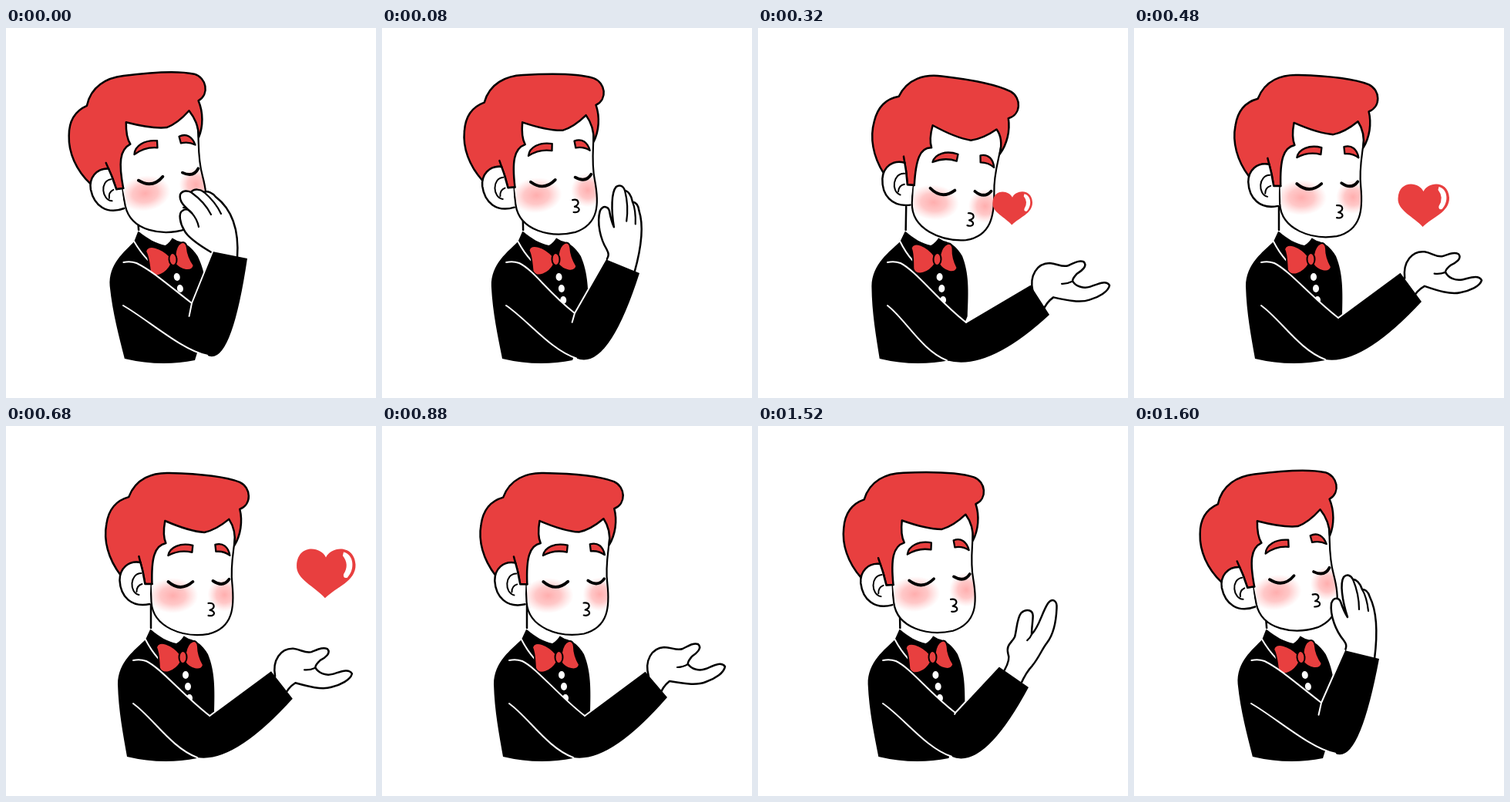
Recreate the animation shown at these times as an HTML page with a canvas. Size 480 by 480 pixels, loop 1680 ms.

```html
<!DOCTYPE html>
<html lang="en">
<head>
<meta charset="utf-8">
<title>Blown kiss</title>
<style>
html, body { margin: 0; width: 100%; height: 100%; overflow: hidden; background: #fff; }
canvas { display: block; width: 480px; height: 480px; }
</style>
</head>
<body>
<canvas id="stage" width="480" height="480"></canvas>
<script>
const ctx = document.getElementById('stage').getContext('2d');
const RED = '#e83f3f', LOOP = 1680, STEP = 80, PIVOT = 470;

// head: x, y, degrees, nod; lean: shift of the bow tie; cuff: upper and lower corner
const poses = [
  { t: 0, head: [-27, -2, -9, -4], lean: -13, armpit: [241, 357], cuff: [268, 290, 313, 299], elbow: [292, 440], tilt: 0, hand: 'cupped' },
  { t: 80, head: [-11, -1, -5, -2], lean: -4, armpit: [250, 370], cuff: [290, 300, 334, 318], elbow: [293, 446], tilt: 0, hand: 'raised' },
  { t: 160, head: [5, 1, -1.5, 1], lean: 7, armpit: [259, 382], cuff: [318, 320, 357, 348], elbow: [293, 455], tilt: 0, hand: 'half' },
  { t: 240, head: [7, 1, 2.5, 3], lean: 5, armpit: [265, 383], cuff: [337, 328, 368, 361], elbow: [297, 450], tilt: -14, hand: 'open' },
  { t: 320, head: [8, 1, 5, 5], lean: 3, armpit: [270, 382], cuff: [353, 333, 378, 372], elbow: [298, 446], tilt: -5, hand: 'open' },
  { t: 480, head: [1, 0, 0.2, 0], lean: 0, armpit: [265, 376], cuff: [345, 317, 373, 355], elbow: [296, 438], tilt: 5, hand: 'open' },
  { t: 880, head: [0, 0, -0.6, 0], lean: 0, armpit: [263, 376], cuff: [341, 318, 370, 352], elbow: [295, 438], tilt: 0, hand: 'open' },
  { t: 1360, head: [0, 0, 0, 0], lean: 0, armpit: [264, 376], cuff: [342, 318, 371, 353], elbow: [295, 438], tilt: 0, hand: 'open' },
  { t: 1440, head: [-1, 0, 0, 0], lean: 0, armpit: [264, 376], cuff: [344, 319, 373, 354], elbow: [295, 438], tilt: 3, hand: 'open' },
  { t: 1520, head: [-9, -1, -4, -1], lean: -3, armpit: [256, 372], cuff: [312, 312, 351, 339], elbow: [293, 447], tilt: 0, hand: 'half' },
  { t: 1600, head: [-23, -1.5, -9, -3], lean: -13, armpit: [243, 359], cuff: [273, 291, 318, 302], elbow: [292, 440], tilt: 0, hand: 'raised' }
];

const heartKeys = [
  { t: 160, at: [300, 230], width: 36 },
  { t: 320, at: [330, 233], width: 52 },
  { t: 480, at: [375.5, 229], width: 67 },
  { t: 560, at: [398, 216], width: 75 },
  { t: 640, at: [415, 190], width: 77 },
  { t: 720, at: [423, 152], width: 77 },
  { t: 800, at: [425, 104], width: 76 }
];

// Each hand is drawn around the cuff it was posed with.
const hands = {
  cupped: {
    cuff: [268, 290, 313, 299],
    shape: 'M268 292C256 285 236 273 231 262C226 254 223 240 229 237C233 234 237 235 241 240C232 232 224 225 226 216C229 210 236 211 240 213C244 208 252 209 257 213C262 211 268 214 272 219C289 232 303 255 300 298',
    creases: 'M241 240Q248 248 250 258M240 213Q258 226 266 242M257 213Q272 226 279 241'
  },
  raised: {
    cuff: [273, 291, 318, 302],
    shape: 'M273 293C277 285 275 282 272 278C262 266 254 246 256 230C259 221 266 223 268 228C270 234 272 240 277 248C270 226 267 204 272 196C276 192 281 193 284 199C288 199 293 203 296 212C301 212 304 215 306 222C314 238 317 262 312 302',
    creases: 'M284 199Q292 218 292 238M296 212Q302 222 304 240'
  },
  half: {
    cuff: [318, 320, 357, 348],
    shape: 'M326 325Q334 311 331 304C328 292 336 290 340 282C343 272 343 258 349 251C356 245 364 248 364 255C364 262 362 270 362 279C372 270 376 250 384 239C390 232 396 236 395 246C394 262 390 280 382 290C374 300 372 308 362 320Q354 328 347 343',
    creases: 'M362 279Q360 284 356 287'
  },
  open: {
    cuff: [341, 318, 370, 352],
    shape: 'M346 325C340 304 350 288 366 287C376 287 382 292 390 289C398 285 404 281 410 283C416 288 408 295 402 299C399 303 396 306 397 309C402 316 412 318 420 315C430 311 440 305 445 312C444 320 432 328 420 332C408 337 390 334 373 331Q364 338 360 350',
    creases: 'M397 309Q390 313 383 313'
  }
};

function draw(path, fill, stroke, width = 2.5) {
  const shape = new Path2D(path);
  if (fill) { ctx.fillStyle = fill; ctx.fill(shape); }
  if (stroke) { ctx.strokeStyle = stroke; ctx.lineWidth = width; ctx.stroke(shape); }
}

function ellipse(x, y, rx, ry, fill, stroke) {
  ctx.beginPath();
  ctx.ellipse(x, y, rx, ry, 0, 0, Math.PI * 2);
  ctx.fillStyle = fill;
  ctx.fill();
  if (stroke) { ctx.strokeStyle = stroke; ctx.lineWidth = 2; ctx.stroke(); }
}

function within(paint) {
  ctx.save();
  paint();
  ctx.restore();
}

function rotateAbout(x, y, degrees) {
  ctx.translate(x, y);
  ctx.rotate(degrees * Math.PI / 180);
  ctx.translate(-x, -y);
}

function mix(a, b, k) {
  if (Array.isArray(a)) return a.map((v, i) => mix(v, b[i], k));
  return typeof a === 'number' ? a + (b - a) * k : a;
}

function sample(keys, t) {
  const i = keys.findLastIndex(key => key.t <= t);
  const from = keys[i], to = keys[i + 1] || from;
  const k = to === from ? 0 : (t - from.t) / (to.t - from.t);
  return Object.fromEntries(Object.keys(from).map(name => [name, mix(from[name], to[name], k)]));
}

const leanAt = (lean, y) => lean * (PIVOT - y) / 170;

function drawTorso({ lean }) {
  within(() => {
    ctx.transform(1, 0, -lean / 170, 1, leanAt(lean, 0), 0);
    draw('M187 264L181 277C168 290 145 306 145 335C146 370 152 400 157 429Q203 440 248 431L270 374C271 340 271 318 262 296Q252 279 237 276L230 272Z', '#000');
    draw('M188 240V264C198 273 210 280 221 282Q228 278 232 270L236 240Z', '#fff');
    draw('M188 232V262', null, '#000');
    draw('M181 277Q188 291 198 302', null, '#fff', 2);
    for (const [x, y] of [[233, 323], [236, 338], [238, 353]]) ellipse(x, y, 4, 5, '#fff');
  });
}

function blush(x, y, rx, ry) {
  within(() => {
    ctx.translate(x, y);
    ctx.scale(rx, ry);
    const glow = ctx.createRadialGradient(0, 0, 0, 0, 0, 1);
    glow.addColorStop(0, 'rgba(255,135,135,.68)');
    glow.addColorStop(0.5, 'rgba(255,145,145,.5)');
    glow.addColorStop(1, 'rgba(255,170,170,0)');
    ellipse(0, 0, 1, 1, glow);
  });
}

function drawFeatures() {
  blush(216, 220, 33, 23);
  blush(283, 219, 22, 22);
  draw('M210 168C212 157 226 151 242 155L241 164Q225 160 210 168Z', RED, '#000', 2.3);
  draw('M271 154C281 151 288 157 290 168Q282 162 272 163Z', RED, '#000', 2.3);
  draw('M210 202Q226 216 242 202M268 201Q281 210 289 199', null, '#000', 3.8);
  draw('M262 230C270 229 272 236 264 239C272 240 271 248 262 246', null, '#000', 2.2);
}

function drawHead([x, y, turn, nod]) {
  const jaw = 'M297 140C296 160 290 180 293 205C296 235 294 262 262 270C230 275 190 262 188 228L187 200';
  const face = jaw + 'L200 130L290 118Z';
  const earRim = 'M174 177C158 174 147 185 147 200C148 221 162 236 186 231';
  const brow = nod / 2;
  within(() => {
    ctx.translate(x, y);
    rotateAbout(215, 270, turn);
    draw(face, '#fff');
    within(() => {
      ctx.clip(new Path2D(face));
      ctx.translate(0, nod);
      drawFeatures();
    });
    draw(jaw, null, '#000', 2.2);
    draw(`M159 92C168 68 190 60 212 61C250 62 285 66 303 73C318 80 319 102 303 108C307 124 304 142 296 155C298 140 295 130 289 ${121 + brow}q-17 14 -32 17c-17 -1 -35 -8 -51 -15c-2 11 -2 22 1 29C192 155 188 172 189 205L180 205Q178 190 174 177C160 175 153 182 148 193C132 172 126 148 130 127C133 107 144 96 159 92Z`, RED, '#000');
    draw(earRim + 'L187 206H180Z', '#fff');
    draw(earRim, null, '#000');
    draw('M175 191C160 191 159 216 172 219M176 205Q169 207 169 215', null, '#000', 2);
    draw('M172 169Q177 186 180 205H189', null, '#000');
  });
}

function drawBow({ lean, head }) {
  within(() => {
    ctx.translate(leanAt(lean, 300), 0);
    rotateAbout(230, 300, head[2] / 2);
    draw('M226 296C216 284 198 276 195 287C199 296 198 306 199 314C204 325 220 318 227 306Z', RED, '#000', 2);
    draw('M233 294C236 278 248 274 249 286C249 296 252 303 256 310C253 320 238 315 232 306Z', RED, '#000', 2);
    ellipse(229.5, 300, 5, 8, RED, '#000');
  });
}

function cuffFrame([x1, y1, x2, y2]) {
  return { x: (x1 + x2) / 2, y: (y1 + y2) / 2, angle: Math.atan2(y2 - y1, x2 - x1) };
}

function drawHand(pose) {
  const { cuff, shape, creases } = hands[pose.hand];
  const rest = cuffFrame(cuff), now = cuffFrame(pose.cuff);
  within(() => {
    ctx.translate(now.x, now.y);
    ctx.rotate(now.angle - rest.angle + pose.tilt * Math.PI / 180);
    ctx.translate(-rest.x, -rest.y);
    draw(shape, '#fff', '#000');
    draw(creases, null, '#000', 2.2);
  });
}

function drawSleeve({ lean, armpit, cuff, elbow }) {
  const [ax, ay] = armpit, [x1, y1, x2, y2] = cuff;
  const top = 182 + leanAt(lean, 305);
  const lapel = `C${top + 20} 315 ${ax - 36} ${ay - 28} ${ax} ${ay}`;
  const end = `${248 - lean} ${430 + lean * 0.4}`;
  const underside = `C${215 - lean} 418 ${190 + lean / 2} 378 ${165 + lean} 360`;
  // The elbow fold lengthens as the forearm rises.
  const length = Math.hypot(ax - x1, ay - y1);
  const fold = Math.max(0, (ay - y1) / length - 0.7) * 80 / length;
  draw(`M${top} 305${lapel}L${x1} ${y1}L${x2} ${y2}Q${elbow} ${end}${underside}Z`, '#000');
  draw(`M${top - 17} 304Q${top - 8} 302 ${top} 305${lapel}`, null, '#fff', 2);
  draw(`M${x1} ${y1}L${ax} ${ay}L${ax + (ax - x1) * fold / 2} ${ay + (ay - y1) * fold}`, null, '#fff', 2);
  draw(`M${end}${underside}`, null, '#fff', 2);
}

function drawHeart(t) {
  if (t < 160 || t >= 880) return;
  const { at, width } = sample(heartKeys, t);
  within(() => {
    ctx.translate(...at);
    ctx.scale(width / 67, width / 67);
    draw('M0 -17C-6 -30 -32 -32 -33 -8C-34 8 -12 16 -1 29C12 16 34 10 33.5 -9C32 -32 6 -30 0 -17Z', RED);
    draw('M20 -23C32 -20 33 -3 24 6Q19 7 20 2Q27 -9 19 -19Z', '#fff');
  });
}

function render(now) {
  const t = Math.floor(now % LOOP / STEP) * STEP;
  const pose = sample(poses, t);
  ctx.fillStyle = '#fff';
  ctx.fillRect(0, 0, 480, 480);
  ctx.lineCap = ctx.lineJoin = 'round';
  drawTorso(pose);
  drawHead(pose.head);
  drawBow(pose);
  drawHand(pose);
  drawSleeve(pose);
  drawHeart(t);
}

const start = performance.now();
function tick() {
  render(performance.now() - start);
  requestAnimationFrame(tick);
}
tick();
</script>
</body>
</html>
```
